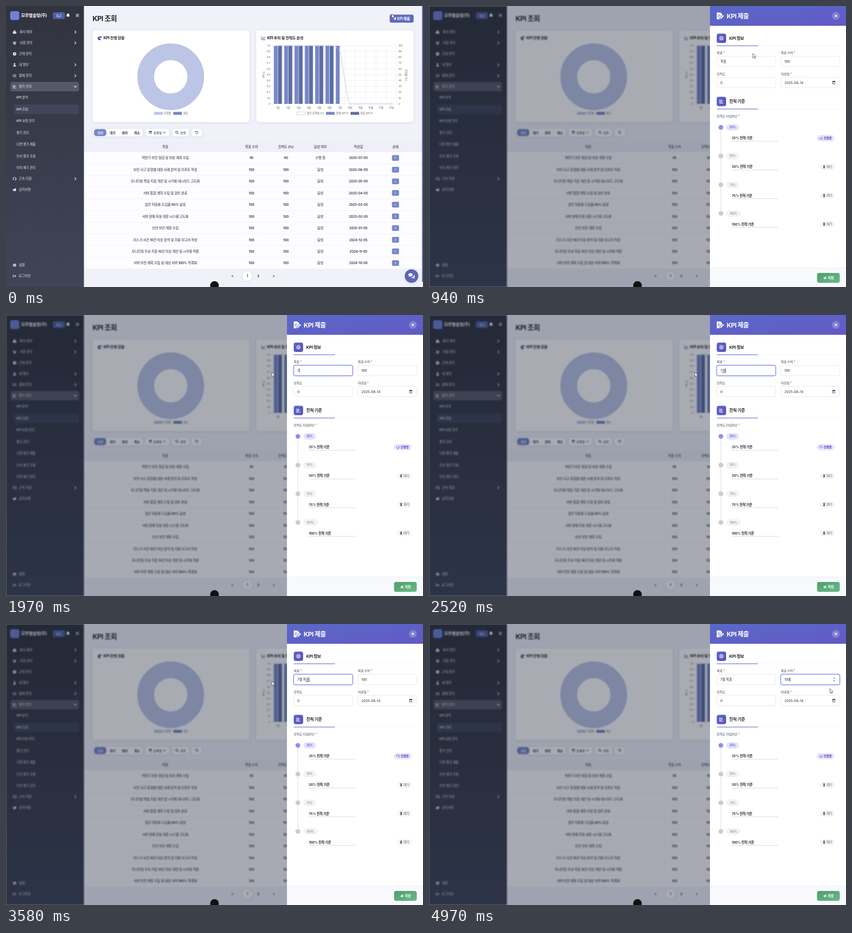
Recreate the animation shown at these times as an HTML page. Size 800 px wide and 540 px high, loop 5000 ms.

```html
<!DOCTYPE html>
<html lang="ko">
<head>
<meta charset="utf-8">
<title>KPI</title>
<style>
  html, body { margin: 0; width: 100%; height: 100%; overflow: hidden; background: #f1f2f9; }
  svg { display: block; width: 800px; height: 540px; }
  text { font-family: Inter, "Noto Sans CJK KR", "Noto Sans CJK", sans-serif; letter-spacing: -.04em; white-space: pre; }
  .card { filter: drop-shadow(0 1px 3px rgba(60, 70, 120, .12)); }
</style>
</head>
<body>
<svg id="stage" viewBox="0 0 800 540"></svg>
<script>
const ICONS = {
  plane: 'M10 0 0 6l3 1.2L8 2.5 4 7.6V10l1.7-1.7L8.5 9.5z',
  bell: 'M5 0a3.4 3.4 0 0 1 3.4 3.6c0 2 .6 3 1.6 4.2H0c1-1.2 1.6-2.2 1.6-4.2A3.4 3.4 0 0 1 5 0M3.6 8.5h2.8a1.4 1.4 0 0 1-2.8 0',
  menu: 'M0 1h10v1.5H0zM0 4.3h10v1.5H0zM0 7.6h10v1.5H0z',
  city: 'M0 3h3V0h4v4h3v6H0zM1 4.5h1v1H1zM4.4 2h1.2v1.2H4.4zM4.4 5h1.2v1.2H4.4zM8 6h1v1H8z',
  users: 'M5 2a1.7 1.7 0 1 1 0 3.4A1.7 1.7 0 0 1 5 2M2 9.5c0-5 6-5 6 0zM2 .8a1.3 1.3 0 1 1 0 2.6 1.3 1.3 0 0 1 0-2.6M8 .8a1.3 1.3 0 1 1 0 2.6A1.3 1.3 0 0 1 8 .8M0 6.5C0 3.8 2 3.8 3 4.4L2 6.5zM10 6.5C10 3.8 8 3.8 7 4.4l1 2.1z',
  clock: 'M5 0a5 5 0 1 1 0 10A5 5 0 0 1 5 0M4.4 2v3.4l2.4 1.6.6-.9-1.8-1.3V2z',
  user: 'M5 0a2.4 2.4 0 1 1 0 4.8A2.4 2.4 0 0 1 5 0M.8 10c0-6 8.4-6 8.4 0z',
  list: 'M0 .6h2v2H0zM3.5 1H10v1.2H3.5zM0 4h2v2H0zM3.5 4.4H10v1.2H3.5zM0 7.4h2v2H0zM3.5 7.8H10V9H3.5z',
  chart: 'M0 0h1.3v8.7H10V10H0zM2.5 1h4v1.5h-4zM2.5 3.6h6v1.5h-6zM2.5 6.2h3v1.5h-3z',
  headset: 'M0 5a5 5 0 0 1 10 0v3H7.3V4.8h1.2a3.5 3.5 0 0 0-7 0h1.2V8H0zM5 8.8h4V10H5z',
  horn: 'M0 3.5h3L9 0v10L3 6.8 4 10H2L1 6.8H0z',
  gear: 'M4 0h2l.3 1.5 1.4.7 1.4-.6 1 1.7L9 4.4v1.2l1.1 1.1-1 1.7-1.4-.6-1.4.7L6 10H4l-.3-1.5-1.4-.7-1.4.6-1-1.7L1 5.6V4.4L-.1 3.3l1-1.7 1.4.6 1.4-.7zM5 3.3a1.7 1.7 0 1 0 0 3.4 1.7 1.7 0 0 0 0-3.4',
  exit: 'M0 1h4v1.3H1.3v5.4H4V9H0zM3.5 4.2H6V2l4 3-4 3V5.8H3.5z',
  pie: 'M4.5.6v4.9L8 9A5 5 0 1 1 4.5.6M5.5 0A4.6 4.6 0 0 1 10 4.5H5.5z',
  trend: 'M0 0h1.2v8.8H10V10H0zM2 6.5l2.5-3L6.3 5 9 1.5l.8.8-3.4 4.5-1.8-1.5-1.7 2.1z',
  cal: 'M1 1h1.5V0h1.2v1h2.6V0h1.2v1H9v9H1zM2 4v5h6V4z',
  search: 'M4 0a4 4 0 1 1 0 8 4 4 0 0 1 0-8M4 1.3a2.7 2.7 0 1 0 0 5.4 2.7 2.7 0 0 0 0-5.4M6.4 7.3l.9-.9L10 9.1l-.9.9z',
  undo: 'M0 0h1.2v2A4.8 4.8 0 1 1 1 8l1-.9A3.5 3.5 0 1 0 2.3 3H4v1.2H0z',
  target: 'M5 0a5 5 0 1 1 0 10A5 5 0 0 1 5 0M5 1.3a3.7 3.7 0 1 0 0 7.4 3.7 3.7 0 0 0 0-7.4M5 2.5a2.5 2.5 0 1 1 0 5 2.5 2.5 0 0 1 0-5M5 3.8a1.2 1.2 0 1 0 0 2.4 1.2 1.2 0 0 0 0-2.4',
  hourglass: 'M1.5 0h7v1.2H8c0 2-1 3-2 3.8 1 .8 2 1.8 2 3.8h.5V10h-7V8.8H2C2 6.8 3 5.8 4 5 3 4.2 2 3.2 2 1.2h-.5z',
  file: 'M0 0h5.5L8 2.5V4L4.3 7.6V10H0zM1.5 3.5v1h4v-1zM1.5 5.8v1h2.5v-1zM9.3 3.7l1.4 1.4L6.6 9.2 5 9.6l.4-1.7z',
  chat: 'M0 3a3.4 2.8 0 0 1 6.8 0 3.4 2.8 0 0 1-5 2.5L0 6l.6-1.3zM4 7c4 .3 5-2 4-4a2.8 2.5 0 0 1 1.4 4.4L10 9l-2-.6A4 3 0 0 1 4 7'
};
const INK = '#23262f', BLUE = '#7688c8', DARK = '#5d6ca3', PALE = '#bcc5e6', VIOLET = '#5b5fc7';

// Drawing helpers; text and icons are placed by their vertical centre.
const rect = (x, y, w, h, r, fill, more = '') =>
  `<rect x="${x}" y="${y}" width="${w}" height="${h}" rx="${r}" fill="${fill}" ${more}/>`;
const circle = (x, y, r, fill, more = '') => `<circle cx="${x}" cy="${y}" r="${r}" fill="${fill}" ${more}/>`;
const stroke = (d, color, w = 1, more = '') =>
  `<path d="${d}" fill="none" stroke="${color}" stroke-width="${w}" ${more}/>`;
const text = (x, y, s, size = 6.6, color = INK, weight = 500, anchor = 'start', more = '') =>
  `<text x="${x}" y="${y + size * .36}" font-size="${size}" fill="${color}" font-weight="${weight}" text-anchor="${anchor}" ${more}>${s}</text>`;
const mid = (x, y, s, size, color, weight, more) => text(x, y, s, size, color, weight, 'middle', more);
const icon = (name, x, y, size, color) =>
  `<path d="${ICONS[name]}" fill="${color}" fill-rule="evenodd" transform="translate(${x - size / 2} ${y - size / 2}) scale(${size / 10})"/>`;
const chevron = (x, y, color, turn = 0, s = 1) =>
  stroke('M-1.3-2.6 1.3 0-1.3 2.6', color, 1.1, `transform="translate(${x} ${y}) rotate(${turn}) scale(${s})"`);

function sidebar() {
  const menu = [['city', '회사 정보', 50, 1], ['users', '사원 관리', 71, 1], ['clock', '근태 관리', 92],
    ['user', '내 정보', 113, 1], ['list', '결재 관리', 134, 1], ['chart', '평가 관리', 155],
    ['headset', '근속 지원', 332, 1], ['horn', '공지사항', 353], ['gear', '설정', 498], ['exit', '로그아웃', 519]];
  const sub = ['KPI 분석', 'KPI 조회', 'KPI 요청 관리', '평가 관리', '다면 평가 제출', '인사 평가 조회', '이의 제기 관리'];
  const fg = '#e6e8ef';
  return rect(0, 0, 149.5, 540, 0, 'url(#side)') +
    rect(8, 10, 17.5, 17, 4, '#7080d8') +
    text(29, 18.5, '모루별솔빛(주)', 8.3, '#fff', 700) +
    rect(90, 12, 23, 13, 3, '#4f60a3') + mid(101.5, 18.5, '퇴근', 6, '#fff') +
    icon('bell', 119, 18, 7, '#fff') + icon('menu', 137, 18, 6, fg) +
    rect(8.5, 146, 131.5, 18, 4, '#565a68') + rect(15, 189.5, 125, 18, 4, '#42465a') +
    menu.map(([i, s, y, more]) => icon(i, 16.5, y, 6.5, fg) + text(i === 'city' || i === 'users' ? 26 : 24.5, y, s, 6.5, fg) +
      (more ? chevron(133, y, fg) : '')).join('') +
    chevron(133, 155, '#fff', 90) +
    sub.map((s, i) => text(20, 176 + i * 22.5, s, 6.4, fg)).join('');
}

function charts() {
  const monthX = i => 521.6 + i * 19.8, levelY = v => 188 - v * 1.12;
  let s = rect(166, 47, 301, 176, 5, '#fff', 'class="card"') + rect(480, 47, 302, 176, 5, '#fff', 'class="card"') +
    icon('pie', 180, 61.5, 7.5, '#4a5a9c') + text(187, 61.5, 'KPI 진행 현황', 7.4, INK, 700) +
    icon('trend', 494, 61.5, 7.5, '#4a5a9c') + text(501, 61.5, 'KPI 추이 및 진척도 분석', 7.4, INK, 700) +
    circle(316, 136, 48, 'none', `stroke="${PALE}" stroke-width="32"`) +
    rect(284, 203.5, 17, 5.5, 0, PALE) + text(303, 206, '진행중', 5.2, '#666', 400) +
    rect(321, 203.5, 16.5, 5.5, 0, BLUE) + text(340, 206, '완료', 5.2, '#666', 400);
  for (let i = 0; i <= 10; i++) {
    const y = levelY(i * 10);
    s += stroke(`M508 ${y}H752`, '#e6e8f0', .6) + text(507, y, i ? (i / 10).toFixed(1) : '0', 5, '#666', 400, 'end') +
      text(753, y, i * 10, 5, '#666', 400);
  }
  for (let i = 0; i <= 12; i++) s += stroke(`M${511.7 + i * 19.8} 76V191`, '#e6e8f0', .6);
  let d = `M${monthX(0)} 76`, dots = '';
  for (let i = 0; i < 12; i++) {
    const x = monthX(i), y = levelY(i < 6 ? 100 : i === 6 ? 90 : 0);
    s += mid(x, 195, i + 1 + '월', 5, '#666', 400);
    if (i < 7) s += rect(x - 7.7, 76.5, 7.4, 111.5, 0, BLUE);
    if (i < 6) s += rect(x + .4, 76.5, 7.4, 111.5, 0, DARK);
    dots += circle(x, y, 1.1, '#e4e7f5', `stroke="${PALE}" stroke-width=".6"`);
    if (i === 6) d += `C${x - 10} 76 ${x - 3} 80 ${x} ${y}`;
    else if (i === 7) d += `C${x - 15} 102 ${x - 6} 188 ${x} 188`;
    else d += `L${x} ${y}`;
  }
  return s + stroke(d, '#c3cae8', 1) + dots +
    mid(0, 0, 'KPI 수', 5, '#666', 400, 'transform="translate(494.5 132) rotate(-90)"') +
    mid(0, 0, '진척률 (%)', 5, '#666', 400, 'transform="translate(767.5 133) rotate(90)"') +
    rect(558, 203.5, 16, 5.5, 0, '#fff', `stroke="${PALE}" stroke-width=".8"`) + text(577, 206, '평균 진척률 (%)', 5.2, '#666', 400) +
    rect(614, 203.5, 16.5, 5.5, 0, BLUE) + text(633, 206, '전체 KPI 수', 5.2, '#666', 400) +
    rect(661, 203.5, 16.5, 5.5, 0, DARK) + text(680, 206, '완료 KPI 수', 5.2, '#666', 400);
}

function table() {
  const cols = [305.5, 471, 537, 603, 676, 747];
  const goals = ['하반기 보안 점검 및 보완 계획 수립', '보안 사고 유형별 대응 사례 분석 및 리포트 작성',
    '모니터링 핵심 지표 개선 및 시각화 대시보드 고도화', '서버 통합 계획 수립 및 검토 완료', '업무 자동화 도입율 80% 달성',
    '서버 장애 자동 대응 시스템 고도화', '신년 보안 계획 수립', '리스크 사건 10건 이상 분석 및 리뷰 보고서 작성',
    '모니터링 주요 지표 10건 이상 개선 및 시각화 적용', '서버 이전 계획 수립 및 대상 서버 100% 목록화'];
  const pill = (x, w) => rect(x, 236, w, 14.5, 5, '#fff', 'class="card"');
  let s = pill(168, 94) + pill(268, 45) + pill(319, 32) + pill(356, 20) + rect(169, 236.5, 23.5, 13.5, 5, BLUE) +
    ['승인', '대기', '반려', '취소'].map((t, i) => mid(181 + i * 23.4, 243.5, t, 6, i ? INK : '#fff', 600)).join('') +
    icon('cal', 277, 243, 6, INK) + text(283, 243.5, '등록일', 6) + chevron(304, 243, INK, 90, .9) +
    icon('search', 328, 243, 6, INK) + text(334, 243.5, '검색', 6) + icon('undo', 366, 243, 5.5, INK) +
    rect(150, 261, 648, 20, 0, '#eeeff7') + rect(150, 281, 648, 224, 0, '#fdfdff') +
    ['목표', '목표 수치', '진척도 (%)', '달성 여부', '작성일', '상세'].map((t, i) => mid(cols[i], 270.5, t, 6.6)).join('');
  goals.forEach((goal, i) => {
    const y = 292 + i * 22.45, month = (18 - i) % 12 + 1;
    const date = `${i < 7 ? 2025 : 2024}-${String(month).padStart(2, '0')}-05`;
    [goal, i ? 100 : 95, i ? 100 : 90, i ? '달성' : '수행 중', date].forEach((t, c) => s += mid(cols[c], y, t, 6.6));
    s += rect(740.5, y - 5.5, 13.5, 11, 2, BLUE) + chevron(747, y, '#fff', 0, .8) +
      stroke(`M150 ${y + 11.2}H798`, '#eceef5', .7);
  });
  return s + circle(463, 519, 9, '#fff', 'class="card"') +
    ['&lt;', 1, 2, '&gt;'].map((t, i) => mid([434, 463, 484, 513.5][i], 518.5, t, 6.6, INK, 600)).join('');
}

const page = () => rect(0, 0, 800, 540, 0, '#f1f2f9') + sidebar() +
  text(166, 24.5, 'KPI 조회', 13.3, INK, 700) +
  rect(736, 16.5, 46, 15.5, 3.5, '#5f6cc0') + icon('plane', 745.5, 24, 6, '#fff') + text(750.5, 24.5, 'KPI 제출', 7, '#fff', 600) +
  charts() + table() +
  circle(778, 519, 13, '#5d66b4', 'class="card"') + icon('chat', 778, 519, 12, '#e8ebff') +
  rect(798, 0, 2, 530, 0, '#6470c4');

function drawer() {
  const section = (y, name, title) => rect(552, y - 9, 18, 18, 4, 'url(#violet)') + icon(name, 561, y, 7.5, '#fff') +
    text(576, y, title, 8.1, INK, 700) + stroke(`M552 ${y + 14.5}H788`, '#f3f4f9', .8) + stroke(`M552 ${y + 14.5}H631`, VIOLET, 1);
  const label = (x, y, s, need = true) => text(x, y, s + (need ? ' <tspan fill="#c0626c">*</tspan>' : ''), 6.2, '#3c404c');
  const field = (x, y, id = '') => rect(x, y, 113, 20, 3.5, '#fff', `id="${id}" stroke="#e0e3ec" stroke-width=".8"`);
  let s = rect(539, 0, 261, 540, 0, '#fff') + rect(539, 0, 261, 38, 0, 'url(#head)') +
    icon('file', 558.5, 19, 13, '#fff') + text(571, 19.5, 'KPI 제출', 12.2, '#fff', 700) +
    circle(780.5, 19, 7.5, 'rgba(255,255,255,.22)') + stroke('M778.5 17l4 4m0-4l-4 4', '#fff', 1.2) +
    section(62, 'target', 'KPI 정보') + section(183.5, 'chart', '진척 기준') +
    label(552, 90, '목표') + label(675, 90, '목표 수치') + label(552, 130.5, '진척도', false) + label(675, 130.5, '마감일') +
    label(552, 211.5, '진척도 타임라인') +
    field(552, 96.7, 'goalBox') + field(675, 96.7, 'valueBox') + field(552, 137, '') + field(675, 137, '') +
    rect(558.5, 102, 12, 9.5, 0, '#4767b8', 'id="selection"') + text(559, 107, '목표', 6.5, INK, 400, 'start', 'id="goal"') +
    text(682, 107, '100', 6.5, INK, 400, 'start', 'id="value"') +
    stroke('M775.6 105.2l1.8-2 1.8 2m-3.6 2.8l1.8 2 1.8-2', '#444', .9, 'id="stepper"') +
    rect(0, 110.6, 6, .6, 0, INK, 'id="compose"') + rect(0, 102.5, .7, 8.5, 0, '#111', 'id="caret"') +
    text(559, 147.5, '0', 6.5, INK, 400) + text(682, 147.5, '2025-08-14', 6.3, INK, 400, 'start', 'style="letter-spacing:.01em"') +
    icon('cal', 776.5, 147, 6.5, '#222') + stroke('M560 233V399', '#e3e4ea', 1.4);
  [25, 50, 75, 100].forEach((n, i) => {
    const y = 233.3 + i * 55.1, w = n === 100 ? 26 : 23, on = !i;
    s += circle(560, y, 5.3, on ? '#dfe1fa' : '#ededf0') + circle(560, y, 4.2, on ? '#8a90e6' : '#cbcbcd') +
      rect(571, y - 5.5, w, 11, 5.5, on ? '#e5e3fb' : '#f4f4f6', `stroke="${on ? '#d2cff6' : '#dfdfe4'}" stroke-width=".6"`) +
      mid(571 + w / 2, y, n + '%', 5.6, on ? VIOLET : '#8a8c94', on ? 700 : 500) +
      text(581, y + 20.7, n + '% 진척 기준', 6.5, INK, 600) + stroke(`M581 ${y + 26.7}H670`, '#cdd0d8', .8) +
      (on ? rect(744, 248, 34, 12, 6, '#e8e4fc') + text(757, 254, '진행중', 6, '#4f46c0', 700)
        : rect(750, y + 15, 28, 11.5, 5.7, '#f3f4f6') + icon('hourglass', 758, y + 20.7, 5.4, '#555') + text(762.5, y + 20.7, '대기', 6, '#4b4e58'));
  });
  return s + circle(0, 0, 2.4, 'none', 'id="spinner" stroke="#4f46c0" stroke-width=".9" stroke-dasharray="11 4.08"') +
    rect(539, 503, 261, 37, 0, '#f8f9fc') + stroke('M539 503.3H800', '#e8eaf0', .7) +
    rect(744.5, 513, 43.5, 19, 4, 'url(#green)') + icon('plane', 759, 522.5, 6, '#fff') + text(765, 522.5, '저장', 6.6, '#fff', 600);
}

const gradient = (id, from, to, end = 'x2="1" y2="1"') =>
  `<linearGradient id="${id}" x1="0" y1="0" ${end}><stop stop-color="${from}"/><stop offset="1" stop-color="${to}"/></linearGradient>`;
stage.innerHTML = '<defs>' + gradient('side', '#31343f', '#3f4458', 'x2="0" y2="1"') + gradient('head', '#5a69c8', '#6259c5') +
  gradient('violet', '#5c66c8', '#5b53ba') + gradient('green', '#529c70', '#68bb86') + '</defs>' +
  `<g id="base">${page()}</g>` + rect(0, 0, 800, 540, 0, 'rgb(15,23,42)', 'id="shade"') +
  `<g id="panel">${drawer()}</g>` + circle(400, 537, 8.3, '#111') +
  '<path id="pointer" d="M0 0v8.4l2-1.8 1.4 3 1.5-.7-1.4-2.9h2.6z" fill="#fff" stroke="#33363f" stroke-width=".7"/>';

const el = Object.fromEntries([...stage.querySelectorAll('[id]')].map(n => [n.id, n]));
const show = (node, on) => node.style.display = on ? '' : 'none';
const clamp = v => Math.max(0, Math.min(1, v));
const OPEN = 30, FOCUS = 1080, SELECT = 1280, NEXT = 4480;
const MOVES = [[0, 740, 15], [60, 741, 15], [330, 754, 19], [620, 754, 19], [1060, 592, 107], [1120, 592, 107],
  [1400, 510, 110], [3850, 510, 110], [4180, 728, 94], [4400, 722, 106], [4560, 722, 106], [4940, 769, 124], [5000, 769, 124]];
const TYPING = [[1900, '7'], [2120, '7ㅇ'], [2290, '7우'], [2440, '7워'], [2620, '7월'], [2800, '7월 '], [2960, '7월 ㅁ'],
  [3100, '7월 모'], [3240, '7월 목'], [3380, '7월 목ㅍ'], [3500, '7월 목표']];

function pointerAt(t) {
  const i = MOVES.findIndex(m => m[0] > t), [t0, x0, y0] = MOVES[i - 1], [t1, x1, y1] = MOVES[i];
  const u = (t - t0) / (t1 - t0), k = u * u * (3 - 2 * u);
  return [x0 + (x1 - x0) * k, y0 + (y1 - y0) * k];
}

function focusBox(box, on) {
  box.style.stroke = on ? '#7f8ee6' : '#e0e3ec';
  box.style.strokeWidth = on ? 1.2 : .8;
  box.style.filter = on ? 'drop-shadow(0 0 1px rgba(110,125,230,.55))' : '';
}

function draw(t) {
  const slide = 1 - (1 - clamp((t - OPEN) / 270)) ** 3;
  el.panel.setAttribute('transform', `translate(${262 * (1 - slide)} 0)`);
  show(el.panel, slide > 0);
  el.shade.setAttribute('opacity', .36 * slide);
  el.base.style.filter = slide ? `blur(${1.15 * slide}px)` : '';

  const typed = TYPING.filter(k => k[0] <= t).pop();
  const second = t >= NEXT, first = t >= FOCUS && !second, selected = t >= SELECT && !typed;
  focusBox(el.goalBox, first);
  focusBox(el.valueBox, second);
  el.goal.textContent = typed ? typed[1] : '목표';
  el.goal.setAttribute('fill', selected ? '#e8edff' : INK);
  show(el.selection, selected);
  show(el.stepper, second);

  const since = second ? NEXT : typed ? typed[0] : FOCUS;
  const end = second ? 682 + el.value.getComputedTextLength() : 559 + el.goal.getComputedTextLength();
  show(el.caret, (first || second) && !selected && Math.floor((t - since) / 500) % 2 === 0);
  el.caret.setAttribute('x', end + .3);
  show(el.compose, first && typed && /[ㄱ-힣]$/.test(typed[1]));
  el.compose.setAttribute('x', end - 5.9);

  el.spinner.setAttribute('transform', `translate(752 254) rotate(${t * .36 - 60})`);
  el.pointer.setAttribute('transform', `translate(${pointerAt(t)})`);
}

function loop() {
  draw(performance.now() % 5000);
  requestAnimationFrame(loop);
}
loop();
</script>
</body>
</html>
```
